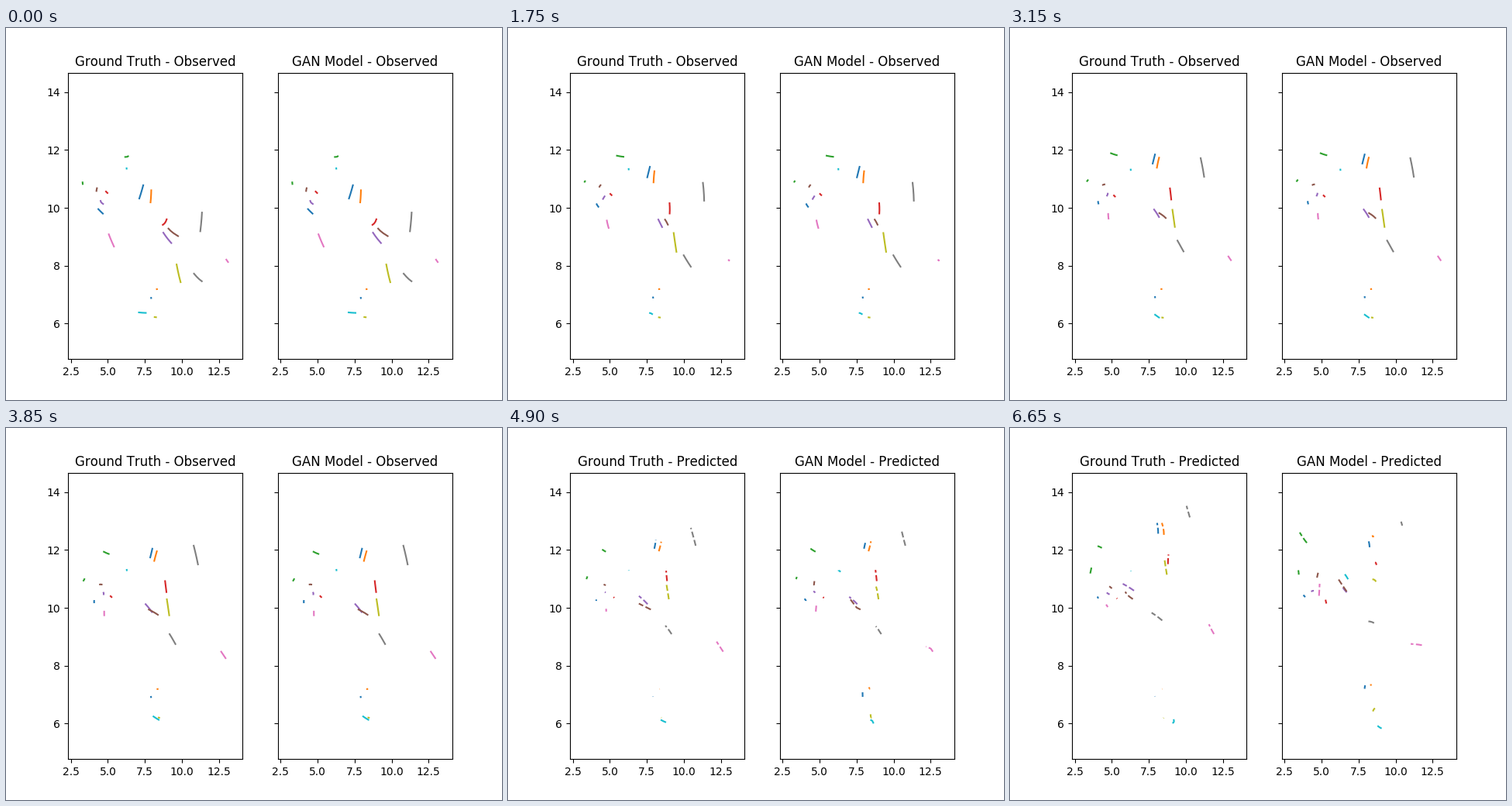
A matplotlib script that plays this animation: 640x480 px, repeating every 7000 ms.

```python
import matplotlib.pyplot as plt
import numpy as np
from matplotlib.animation import FuncAnimation

plt.rcParams["text.kerning_factor"] = 6
plt.rcParams["path.simplify"] = False

STEPS, INTERVAL = 20, 350
TRAIL = 4            # points per trail
PREDICT_FROM = 12    # step at which the titles and dashes change
SPLIT, END = 15, 22  # last time shared by both panels, last time of all
X_LIM, Y_LIM = (2.309, 14.106), (4.771, 14.676)
LEFT, TOP, WIDTH, HEIGHT = 80, 57.6, 225.45, 369.6

fig, axes = plt.subplots(1, 2, sharey=True, figsize=(6.4, 4.8), dpi=100)
for ax in axes:
    ax.set_xlim(*X_LIM)
    ax.set_ylim(*Y_LIM)
    ax.set_xticks(np.arange(2.5, 13, 2.5))
    ax.set_yticks(range(6, 15, 2))

trails = []


def curve(points, start):
    """Polynomial through evenly timed points, sampled at start..END."""
    n = len(points)
    coeffs = np.polyfit(np.linspace(0, 1, n), np.array(points), n - 1)
    return np.vander(np.linspace(0, 1, END - start + 1), n) @ coeffs


def to_data(path):
    """Turn pixels of the left panel into data coordinates."""
    x, y = path.T
    return (X_LIM[0] + (x - LEFT) / WIDTH * (X_LIM[1] - X_LIM[0]),
            Y_LIM[1] - (y - TOP) / HEIGHT * (Y_LIM[1] - Y_LIM[0]))


def walker(color, truth, model):
    """Add one person: key points of the true walk and of the model's end."""
    real = curve(truth, 0)
    fake = np.vstack([real[:SPLIT], curve([real[SPLIT], *model], SPLIT)])
    for ax, path in zip(axes, (real, fake)):
        line, = ax.plot([], [], color="tab:" + color, lw=1.5)
        trails.append((line, *to_data(path)))


walker("blue",
       [(172, 220), (180.3, 190.3), (186.1, 167), (190.5, 146.4), (189.8, 122.5)],
       [(191.9, 146), (193.5, 154)])
walker("orange",
       [(186.5, 225), (187.9, 196.7), (191.3, 171.5), (197.3, 148.8), (196, 122.5)],
       [(198.3, 142), (196.5, 139.8)])
walker("green",
       [(157.5, 165.5), (147.6, 166), (132.6, 162.5), (122.2, 157.2), (113, 152.3)],
       [(114, 150), (103.3, 134.8)])
walker("red", [(129, 211), (135, 217), (138.3, 220.2)],
       [(136.5, 221), (137.7, 226.5)])
walker("purple",
       [(125.3, 227), (122.9, 220), (126, 214.5), (125, 211.9), (128.5, 214.8)],
       [(122, 210), (118, 211)])
walker("brown", [(116.7, 210.3), (121.2, 201.9), (131.5, 207)],
       [(125.4, 194.2), (127, 186.8)])
walker("pink", [(139.3, 282), (127.9, 250.3), (126.7, 236), (124, 227.8)],
       [(128, 219), (129, 201)])
walker("gray",
       [(250.7, 262.3), (253, 219), (247.7, 176), (237, 132.5), (227.8, 100.5)],
       [(236, 127.5), (234, 120.8)])
walker("olive",
       [(225.3, 328), (216.7, 284.7), (210.6, 241.7), (205, 205), (199.3, 169)],
       [(202.5, 199.5), (197, 195.3)])
walker("cyan", [(155.6, 181), (156, 185)],
       [(160.8, 187.8), (166, 195.7)])

walker("blue", [(125, 239.5), (114.8, 228), (113.8, 222.7), (112.8, 217.5)],
       [(110.8, 218.7), (108, 215.5)])
walker("orange", [(194.6, 337), (196.3, 336.7)],
       [(195.3, 333), (195, 330.5)])
walker("green", [(99, 201.3), (99.2, 197.9), (101.4, 194.4), (105.2, 179.5)],
       [(102.1, 190), (101.5, 183.5)])
walker("red",
       [(202.3, 254), (208.7, 237.3), (207, 211.7), (204.2, 186.3), (204.5, 163.2)],
       [(202.7, 178), (200.5, 173.3)])
walker("purple",
       [(213.3, 277.5), (198, 255.2), (188.3, 237.5), (171, 218.5), (145.5, 201)],
       [(165.3, 213.5), (157.5, 204)])
walker("brown",
       [(222, 268.5), (205.7, 252.6), (196, 241), (171.5, 227.9), (148.7, 211.3)],
       [(165.7, 213.5), (153.5, 195.5)])
walker("pink",
       [(286.5, 302), (285, 299.7), (283.3, 297), (270.7, 278), (256.7, 253.2)],
       [(263, 280.6), (246.5, 278.6)])
walker("gray",
       [(252.7, 326.8), (234.3, 305.6), (218.6, 278.8), (204.5, 256.7), (182.7, 238.3)],
       [(200.5, 252.5), (191, 249.5)])
walker("olive", [(191.8, 373), (197, 373.7), (198, 374.1)],
       [(197.5, 366.5), (200.3, 361.5)])
walker("cyan",
       [(171.5, 367), (183.6, 367.9), (190.3, 372.2), (203.7, 379.7), (211.2, 375.8)],
       [(203, 383.5), (209, 387.7)])
walker("blue", [(187.3, 348.5), (187, 346)],
       [(187, 337.5), (187.7, 332)])


def draw(step):
    predicted = step >= PREDICT_FROM
    phase = "Predicted" if predicted else "Observed"
    for ax, name in zip(axes, ("Ground Truth", "GAN Model")):
        ax.set_title(f"{name} - {phase}")
    now = slice(step, step + TRAIL)
    for line, x, y in trails:
        line.set_data(x[now], y[now])
        line.set_linestyle("--" if predicted else "-")
    return [line for line, *_ in trails]


anim = FuncAnimation(fig, draw, frames=STEPS, interval=INTERVAL,
                     repeat=True, repeat_delay=0)
plt.show()
```
